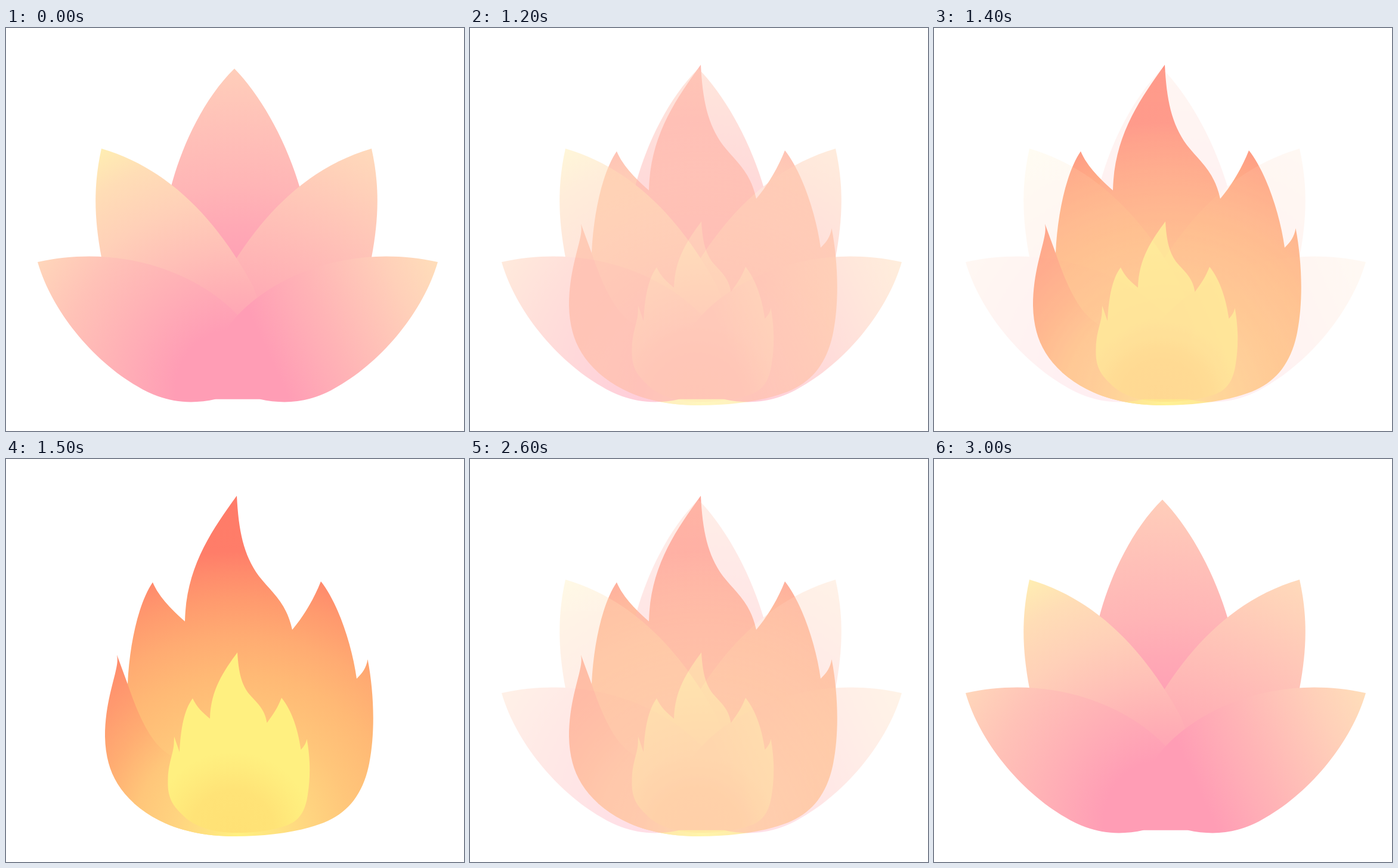
Animation of 768x675 px, one loop 3100 ms. Source, as an HTML page:

```html
<!DOCTYPE html>
<html lang="en">
<head>
<meta charset="utf-8">
<title>Lotus and flame</title>
<style>
  html, body { margin: 0; width: 100%; height: 100%; overflow: hidden; background: #fff; }
  svg { display: block; width: 100%; height: 100%; }
</style>
</head>
<body>
<svg viewBox="0 0 768 675">
  <defs id="defs"></defs>
  <g id="flame" opacity="0">
    <path fill="url(#fire)" d="M387 61.5C390 120 398 160 424 196C446 224 470 240 480 286
      C500 262 516 235 528 205C556 240 580 310 588 368C598 358 604 350 606.5 335.5
      C617 390 620 460 608 515C598 560 575 590 540 606C500 624 440 632 385 632
      C310 632 255 612 215 577L204 377C207 310 222 242 246 206.500C256 230 275 250 300 272
      C302 180 345 120 387 61.5Z"/>
    <path fill="url(#tongue)" d="M186 328L204 377C222 430 244 480 277 497L300 540L385 632
      C310 632 255 612 215 577C180 545 167 510 166 465C166 410 182 370 186 345
      C187 338 187 334 186 328Z"/>
    <path fill="url(#core)" d="M388 324C390 358 395 378 408 394C420 408 434 418 437.500 442
      C448 428 456 416 462 400C480 422 490 455 494.500 487C500 481 503 476 504.500 469
      C510 500 511 530 506 562C502 590 492 606 470 614C440 624 415 626 385 626
      C350 626 315 617 295 595C277 578 271 564 271.500 540C271 512 280 496 281.500 478L282 465
      L291 491C293 450 299 420 313 401C320 416 330 425 342 435C343 386 366 354 388 324Z"/>
  </g>
  <g id="lotus">
    <path fill="url(#center)" d="M383 68C426 112 468 185 492 265V400H277V265C294 200 330 120 383 68Z"/>
    <path fill="url(#upperRight)" transform="matrix(-1 0 0 1 773 0)" d=""/>
    <path fill="url(#upperLeft)" d="M160 202C270 234 352 318 414 432L440 500L425 621H350L160 384
      C148 320 146 265 160 202Z" id="upper"/>
    <path fill="url(#lowerLeft)" d="M53 392C200 360 330 414 395 488C420 520 438 575 430 621.500H352
      C306 632 262 626 220 600C150 560 78 478 53 392Z" id="lower"/>
    <path fill="url(#lowerRight)" d=""/>
  </g>
</svg>
<script>
const $ = selector => document.querySelector(selector);

function svg(parent, tag, attributes) {
  const node = document.createElementNS('http://www.w3.org/2000/svg', tag);
  for (const name in attributes) node.setAttribute(name, attributes[name]);
  return parent.appendChild(node);
}

function addStops(gradient, length, stops) {
  for (const [at, color] of stops) {
    svg(gradient, 'stop', { offset: at / length, 'stop-color': '#' + color });
  }
}

// Stops are given as distances in pixels from the centre.
function radial(id, cx, cy, stops) {
  const r = stops[stops.length - 1][0];
  const gradient = svg($('#defs'), 'radialGradient',
    { id, cx, cy, r, gradientUnits: 'userSpaceOnUse' });
  addStops(gradient, r, stops);
}

radial('fire', 390, 630, [[0, 'fff07f'], [60, 'ffe380'], [120, 'ffd580'], [190, 'ffc67a'],
  [270, 'ffb975'], [335, 'ffab72'], [395, 'ff9a6e'], [440, 'ff8b6c'], [475, 'ff7d69'], [568, 'ff7b68']]);
radial('tongue', 390, 630, [[0, 'fff07f'], [100, 'ffd580'], [175, 'ffc67a'],
  [240, 'ffad72'], [300, 'ff9a6f'], [364, 'ff8a6c']]);
radial('core', 380, 625, [[0, 'ffe175'], [70, 'ffe377'], [112, 'ffec7d'], [135, 'fff080']]);

radial('center', 385, 622, [[240, 'ffa2b5'], [292, 'ffa9b5'], [360, 'ffb5b6'], [450, 'ffc0b8'], [555, 'ffceba']]);
radial('upperRight', 387, 622, [[100, 'ff9db5'], [205, 'ffb0b5'], [300, 'ffbfb7'], [415, 'ffd1b9'], [480, 'ffdabb']]);
radial('upperLeft', 390, 622, [[100, 'ff9db5'], [190, 'ffb1b5'], [250, 'ffbfb7'], [335, 'ffd0b8'], [415, 'ffddb6'], [480, 'ffeeb2']]);
radial('lowerLeft', 385, 605, [[100, 'ff9db5'], [172, 'ffabb6'], [215, 'ffb3b6'], [300, 'ffc2b7'], [394, 'ffd6ba']]);

// The lower right petal is shaded along a straight, tilted axis.
const axis = { x: 0.908, y: -0.42, from: 170, to: 494 };
const lowerRight = svg($('#defs'), 'linearGradient', {
  id: 'lowerRight', gradientUnits: 'userSpaceOnUse',
  x1: axis.x * axis.from, y1: axis.y * axis.from, x2: axis.x * axis.to, y2: axis.y * axis.to
});
addStops(lowerRight, axis.to - axis.from,
  [[0, 'ff9db5'], [70, 'ffacb6'], [111, 'ffb4b6'], [244, 'ffd0b9'], [324, 'ffdeba']]);

$('[fill="url(#upperRight)"]').setAttribute('d', $('#upper').getAttribute('d'));

// Mirror the outline itself so the tilted shading keeps its direction.
const mirrored = $('#lower').getAttribute('d')
  .replace('H352', 'L352 621.5')
  .replace(/([\d.]+)\s+([\d.]+)/g, (_, x, y) => `${777 - x} ${y}`);
$('[fill="url(#lowerRight)"]').setAttribute('d', mirrored);

const LOOP = 3100, STEP = 100, STEPS = 6;
const clampStep = n => Math.max(0, Math.min(STEPS, n));
const start = performance.now();

function draw(now) {
  const tick = Math.floor((Math.max(0, now - start) % LOOP) / STEP);
  const mix = (clampStep(tick - 9) - clampStep(tick - 24)) / STEPS;
  $('#flame').setAttribute('opacity', mix);
  $('#lotus').setAttribute('opacity', 1 - mix);
  requestAnimationFrame(draw);
}
draw(start);
</script>
</body>
</html>
```
